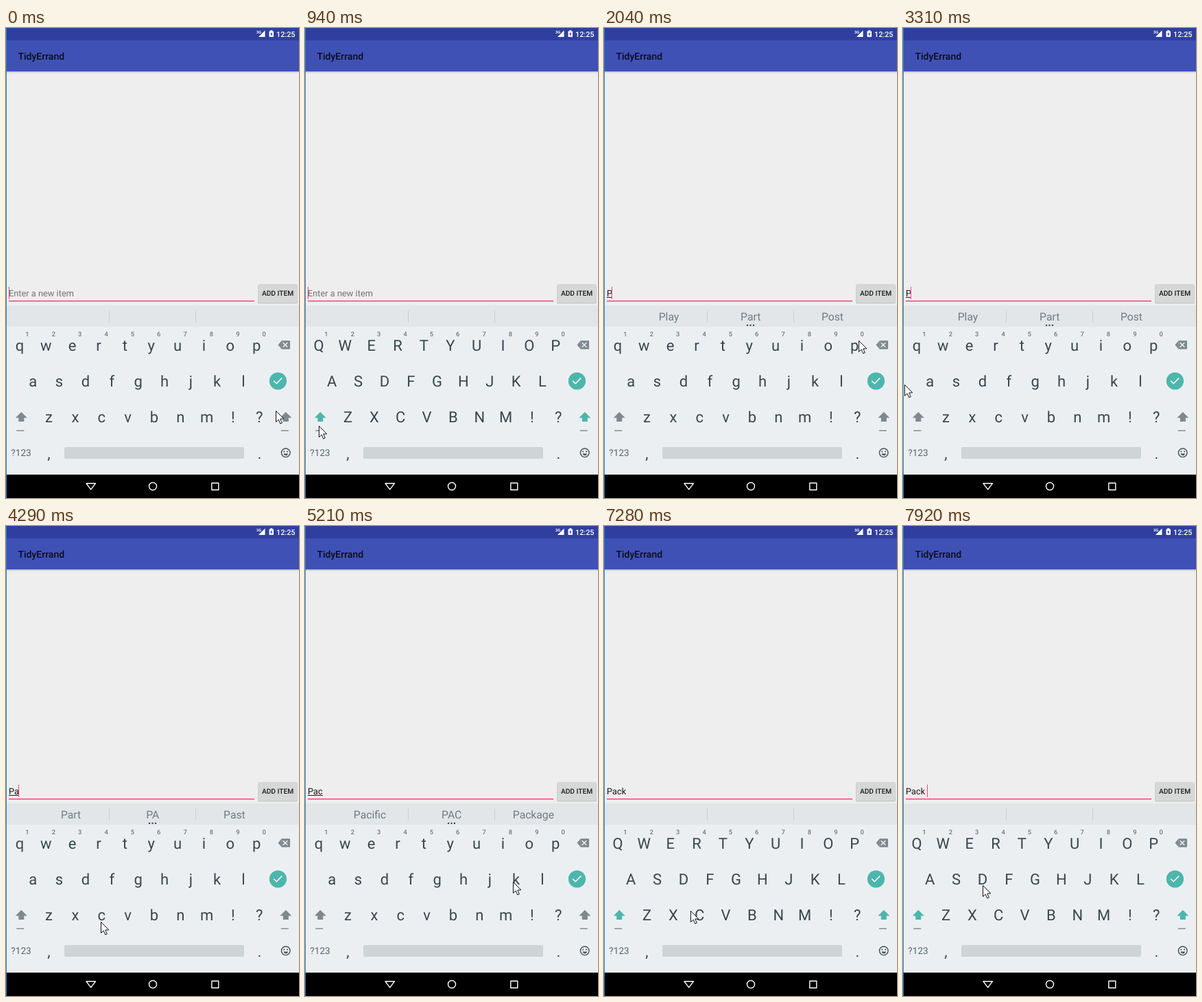
Recreate the animation shown at these times as an HTML page with a canvas. Size 427x683 px, loop 8000 ms.

```html
<!DOCTYPE html>
<html lang="en">
<head>
<meta charset="utf-8">
<title>Todo keyboard</title>
<style>
html, body { margin: 0; width: 100%; height: 100%; overflow: hidden; }
canvas { display: block; width: 427px; height: 683px; }
</style>
</head>
<body>
<canvas id="stage" width="427" height="683"></canvas>
<script>
const ctx = document.getElementById('stage').getContext('2d');
ctx.textRendering = 'geometricPrecision';
ctx.lineJoin = 'round';

const LOOP = 8000, STEP = 130, BLINK = 530;
const KEY_GAP = 38.35, ROW_GAP = 52.3;
const TEAL = '#4db6ac', PINK = '#ff4081', INK = '#37474f', ICON = '#7e898e';
const KEYS = '#eceff1', STRIP = '#e2e6e8';

const MESSAGE = 'Pack ';
const presses = [2040, 3880, 4430, 5510, 6600];
const SHIFT_ON = 940, AUTO_SHIFT = 6750;
const hints = ['', 'Play Part Post', 'Part PA Past', 'Pacific PAC Package',
  'Package Lack Packed', 'Package Lack Packed'];

// Each move runs from wherever the pointer rests to x, y; bow bends its path downward
const moves = [
  { start: 150, time: 650, x: 20, y: 578, bow: 22 },
  { start: 1210, time: 780, x: 371, y: 454 },
  { start: 2480, time: 390, x: 42, y: 515 },
  { start: 3060, time: 260, x: 2, y: 518 },
  { start: 3330, time: 260, x: 36, y: 515 },
  { start: 4020, time: 390, x: 138, y: 575 },
  { start: 4970, time: 260, x: 303, y: 517 },
  { start: 5640, time: 390, x: 240, y: 625 },
  { start: 6190, time: 260, x: 232, y: 615 },
  { start: 7010, time: 600, x: 84, y: 537 },
  { start: 7670, time: 130, x: 116, y: 522 }
];

const smooth = p => p * p * (3 - 2 * p);

function pointerAt(t) {
  let x = 393, y = 556;
  for (const move of moves) {
    if (t < move.start) break;
    const elapsed = (Math.floor((t - move.start) / STEP) + 1) * STEP;
    const p = smooth(Math.min(1, elapsed / move.time));
    x += (move.x - x) * p;
    y += (move.y - y) * p + (move.bow || 0) * Math.sin(Math.PI * p);
  }
  return [Math.round(x), Math.round(y)];
}

function stateAt(t) {
  const count = presses.filter(time => time <= t).length;
  const lastPress = count ? presses[count - 1] : -120;
  return {
    text: MESSAGE.slice(0, count),
    words: t < AUTO_SHIFT ? hints[count] : '',
    caps: t >= AUTO_SHIFT || (t >= SHIFT_ON && count === 0),
    caretOn: Math.floor((t - lastPress) / BLINK) % 2 === 0
  };
}

function box(x, y, w, h, color, radius = 0) {
  ctx.fillStyle = color;
  ctx.beginPath();
  ctx.roundRect(x, y, w, h, radius);
  ctx.fill();
}

function label(text, x, y, size, color, align = 'left', weight = 400) {
  ctx.font = `${weight} ${size}px Roboto, sans-serif`;
  ctx.textAlign = align;
  ctx.fillStyle = color;
  ctx.fillText(text, x, y);
  return ctx.measureText(text).width;
}

function paint({ fill, stroke, width = 1 }) {
  if (fill) { ctx.fillStyle = fill; ctx.fill(); }
  if (stroke) { ctx.strokeStyle = stroke; ctx.lineWidth = width; ctx.stroke(); }
}

function path(points, style) {
  ctx.beginPath();
  points.forEach(([x, y]) => ctx.lineTo(x, y));
  if (!style.open) ctx.closePath();
  paint(style);
}

function circle(x, y, r, style) {
  ctx.beginPath();
  ctx.arc(x, y, r, 0, Math.PI * 2);
  paint(style);
}

function drawBars() {
  box(0, 0, 427, 683, '#eeeeee');
  box(0, 0, 427, 18, '#303f9f');
  box(0, 18, 427, 45, '#3f51b5');
  ['#b9bbc6', '#d8d8dc', '#e6e6e8'].forEach((shade, i) => box(0, 63 + i, 427, 1, shade));
  label('TidyErrand', 17.5, 46, 14, '#0b0d16', 'left', 500);

  label('3G', 365, 8, 5.5, '#fff', 'left', 700);
  path([[377.5, 3.5], [377.5, 13], [368, 13]], { fill: '#fff' });
  box(383.5, 4.5, 6.5, 8.5, '#fff', 0.8);
  box(385.2, 3.3, 3, 2, '#fff');
  path([[387.3, 5.8], [385, 9.3], [386.5, 9.3], [386.2, 12], [388.6, 8.3], [387, 8.3]], { fill: '#303f9f' });
  label('12:25', 421.5, 13, 10.8, '#fff', 'right', 500);

  box(0, 649, 427, 34, '#000');
  const outline = { stroke: '#fff', width: 1.4 };
  path([[117, 661.8], [130.4, 661.8], [123.7, 670.6]], outline);
  circle(214, 666, 5.5, outline);
  ctx.strokeRect(299.8, 661.2, 10, 10);
}

function drawEntry(text, caretOn) {
  const size = 12.8;
  const hinting = !text;
  const inkWidth = label(text || 'Enter a new item', 4, 390, size, hinting ? '#747474' : '#161616');
  const width = hinting ? 0 : inkWidth;
  if (!text.endsWith(' ')) box(4, 391, Math.round(width), 1, '#222');
  box(4, 396, 358, 1.6, PINK);
  if (caretOn) box(Math.max(4, Math.floor(3.7 + width)), 376, 1, 18, PINK);

  box(367, 373, 58, 27.5, '#c4c5c5', 2);
  box(367.5, 372, 57, 27.3, '#d6d7d7', 2);
  label('ADD ITEM', 396, 389, 10.2, '#1c1c1c', 'center', 500);
}

function drawSuggestions(words) {
  box(0, 403, 427, 31, STRIP);
  for (const x of [150, 276]) box(x, 411, 1, 17, '#cbd0d2');
  if (!words) return;
  words.split(' ').forEach((word, i) => label(word, 94.5 + 119.2 * i, 425, 15.7, '#717b80', 'center'));
  for (let i = -1; i <= 1; i++) circle(213.5 + 4.5 * i, 432, 1.2, { fill: INK });
}

function drawShift(x, caps) {
  const color = caps ? TEAL : ICON;
  path([[x, 558], [x + 8.5, 566.5], [x - 8.5, 566.5]], { fill: color });
  box(x - 4, 566, 8, 6, color);
  box(x - 7, 584.5, 11, 1.2, '#66757c');
}

function drawDelete() {
  path([[396.5, 460.5], [401.7, 454.3], [401.7, 466.7]], { fill: ICON });
  box(401.5, 454.3, 12.5, 12.4, ICON, 1);
  for (const side of [-1, 1]) {
    path([[407 - 3.3 * side, 457.2], [407 + 3.3 * side, 463.8]], { stroke: KEYS, width: 1.6, open: true });
  }
}

function drawSmiley(x, y) {
  const color = '#455359';
  circle(x, y, 6.3, { stroke: color, width: 1.4 });
  for (const side of [-1, 1]) circle(x + 2.4 * side, y - 1.8, 1.1, { fill: color });
  ctx.beginPath();
  ctx.arc(x, y + 0.4, 3.4, 0.2, Math.PI - 0.2);
  ctx.fill();
}

function drawKeyboard(caps) {
  box(0, 434, 427, 215, KEYS);
  const rows = { qwertyuiop: 20, asdfghjkl: 39.2, 'zxcvbnm!?': 62.5 };
  Object.entries(rows).forEach(([letters, x], row) => {
    [...(caps ? letters.toUpperCase() : letters)].forEach((key, i) =>
      label(key, x + KEY_GAP * i, 468.8 + ROW_GAP * row, 22, INK, 'center'));
  });
  [...'1234567890'].forEach((digit, i) =>
    label(digit, 31 + KEY_GAP * i, 448, 9.3, '#6c777c', 'center', 500));

  drawDelete();
  circle(396.4, 513, 12.6, { fill: TEAL });
  path([[390.2, 512.8], [394.2, 516.7], [402.3, 508.5]], { stroke: '#fff', width: 1.6, open: true });
  drawShift(22.3, caps);
  drawShift(407.8, caps);

  label('?123', 22, 622, 13.6, '#56646b', 'center');
  label(',', 62.5, 626, 22, INK, 'center');
  label('.', 369.3, 626, 22, INK, 'center');
  box(85, 609, 262, 17, '#cfd4d6', 2);
  drawSmiley(407.7, 617.3);
}

function drawPointer(x, y) {
  ctx.save();
  ctx.translate(x + 0.5, y + 0.5);
  path([[0, 0], [0, 16], [3.7, 12.6], [6.3, 18.5], [8.8, 17.4], [6.3, 11.6], [11.3, 11.4]],
    { fill: '#fff', stroke: '#111' });
  ctx.restore();
}

function draw(t) {
  const { text, words, caps, caretOn } = stateAt(t);
  drawBars();
  drawEntry(text, caretOn);
  drawSuggestions(words);
  drawKeyboard(caps);
  box(0, 0, 1, 683, '#1b86d6');
  drawPointer(...pointerAt(t));
}

const start = performance.now();
function tick() {
  draw((performance.now() - start) % LOOP);
  requestAnimationFrame(tick);
}
draw(0);
requestAnimationFrame(tick);
</script>
</body>
</html>
```
